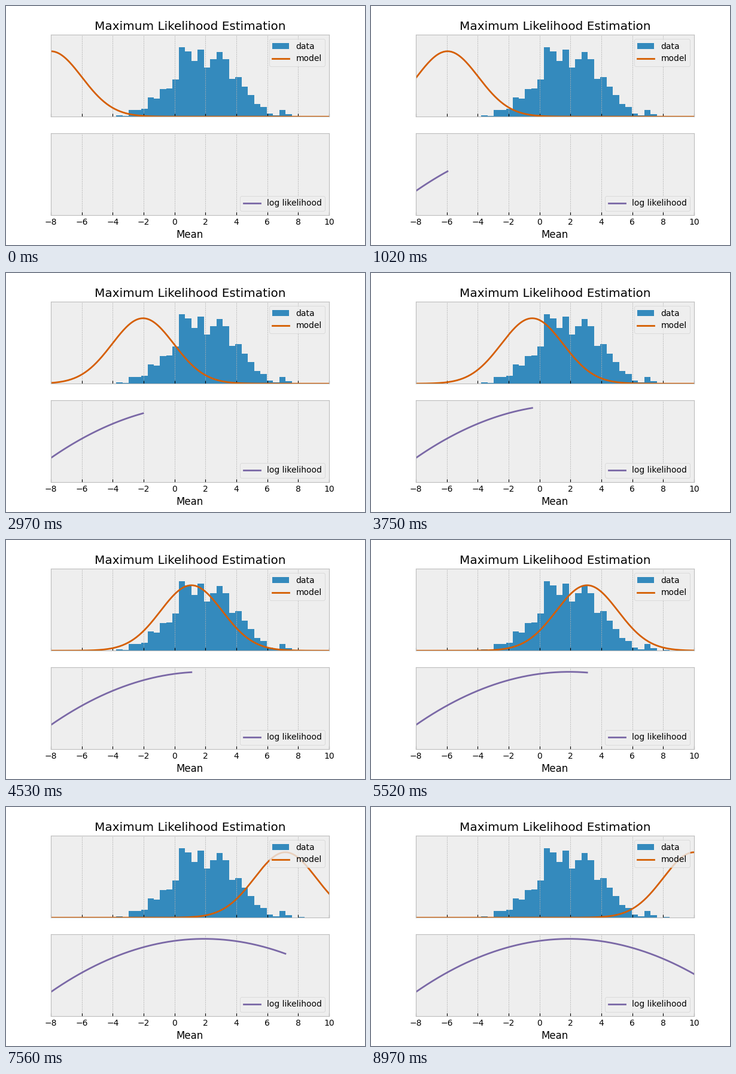
A matplotlib script that plays this animation: 600 px wide and 400 px high, repeating every 9 s.

```python
import numpy as np
import matplotlib.pyplot as plt
from matplotlib.animation import FuncAnimation

plt.style.use("bmh")
plt.rcParams["font.family"] = "DejaVu Sans"

FRAMES = 300
INTERVAL = 30
SIGMA = 2.0
SAMPLES = 1000
X_MIN, X_MAX = -8, 10

means = np.linspace(X_MIN, X_MAX, FRAMES)

# Binned sample, roughly normal around 2
counts = np.array([2, 1, 8, 8, 10, 24, 22, 34, 35, 46, 86, 81, 69, 83, 61,
                   71, 80, 71, 47, 49, 37, 27, 16, 12, 4, 2, 8, 3, 0, 1])
edges = np.linspace(-3.78, 8.41, len(counts) + 1)
centers = (edges[:-1] + edges[1:]) / 2
data_mean = np.average(centers, weights=counts)
data_var = np.average((centers - data_mean) ** 2, weights=counts)


def pdf(x, mean):
    z = (x - mean) / SIGMA
    return np.exp(-z ** 2 / 2) / (SIGMA * np.sqrt(2 * np.pi))


def log_likelihood(mean):
    spread = data_var + (mean - data_mean) ** 2
    norm = np.log(SIGMA * np.sqrt(2 * np.pi))
    return -SAMPLES * (norm + spread / (2 * SIGMA ** 2))


scores = log_likelihood(means)

fig, (top, bottom) = plt.subplots(2, 1, sharex=True, figsize=(6, 4), dpi=100)
fig.subplots_adjust(left=0.125, right=0.9, bottom=0.125, top=0.88, hspace=0.2)

top.set_title("Maximum Likelihood Estimation")
top.hist(centers, bins=edges, weights=counts, density=True,
         color="#348ABD", label="data")
model, = top.plot([], [], color="#D55E00", label="model")
top.set_ylim(0, 0.25)
top.legend(loc="upper right")

curve, = bottom.plot([], [], color="#7A68A6", label="log likelihood")
bottom.set_ylim(-20000, -1000)
bottom.set_xlabel("Mean")
bottom.legend(loc="lower right")

for ax in (top, bottom):
    ax.set_xlim(X_MIN, X_MAX)
    ax.set_xticks(range(X_MIN, X_MAX + 1, 2))
    ax.set_yticks([])


def update(i):
    model.set_data(means, pdf(means, means[i]))
    curve.set_data(means[:i + 1], scores[:i + 1])
    return model, curve


anim = FuncAnimation(fig, update, frames=FRAMES, interval=INTERVAL,
                     repeat=True, repeat_delay=0)
plt.show()
```
